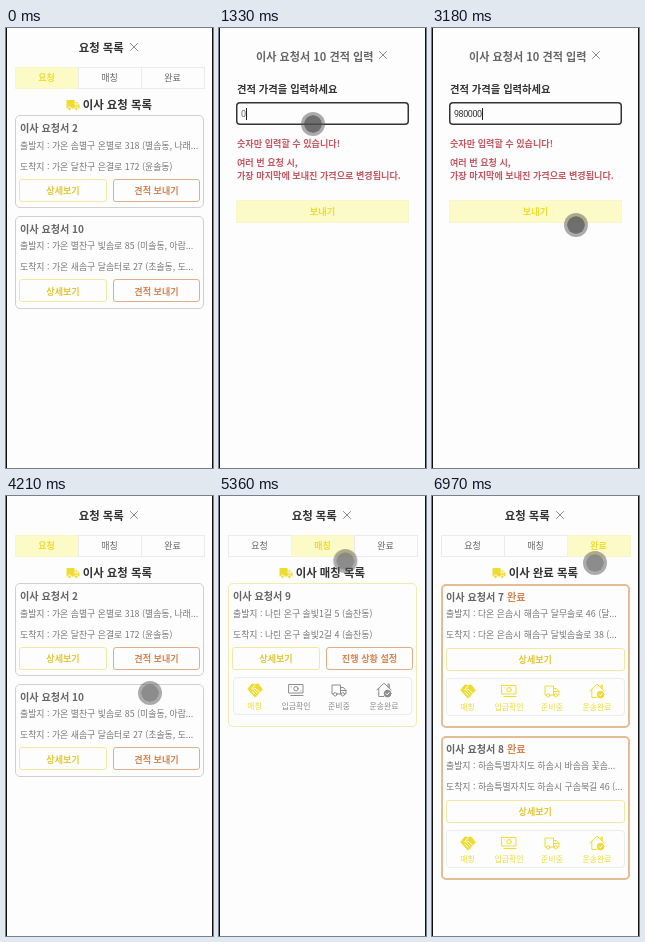
An HTML page for the animation above (7 s loop, 207 by 440 pixels).

```html
<!DOCTYPE html>
<html lang="ko">
<head>
<meta charset="utf-8">
<title>이사 요청 목록</title>
<style>
  html, body { margin: 0; width: 100%; height: 100%; overflow: hidden; background: #fefdfe; }
  body { font-family: "Noto Sans CJK KR", "Noto Sans CJK", "Noto Sans", sans-serif; color: #666; }
  #stage { position: absolute; left: 0; top: 0; width: 207px; height: 440px; overflow: hidden; }
  #stage::after { content: ""; position: absolute; inset: 0; border: solid #111; border-width: 0 1px; }
  .page, .box, .text, svg { position: absolute; box-sizing: border-box; }
  .page { inset: 0; animation: 7s step-end infinite; }
  .box { border: 1px solid #d0d0d0; }
  .text { line-height: 16px; white-space: nowrap; transform: translateY(-50%); }
  .mid { transform: translate(-50%, -50%); }
  .bold { font-weight: 700; }
  .black { color: #333; }
  .soft { color: #777; }
  .gray { color: #8c8c8c; }
  .yellow { color: #f0dc30; }
  .gold { color: #e2c836; }
  .orange { color: #d58550; }
  .red { color: #c5555f; }
  .fill { background: #fcfac6; border-color: #f7f5cc; }

  #requests { animation-name: requests; }
  #form { animation-name: form; }
  #match { animation-name: match; }
  #done { animation-name: done; }
  @keyframes requests {
    0%, 49.43% { visibility: visible; }
    11.71%, 64.57%, 100% { visibility: hidden; }
  }
  @keyframes form {
    0%, 49.43%, 100% { visibility: hidden; }
    11.71% { visibility: visible; }
  }
  @keyframes match {
    0%, 79.14%, 100% { visibility: hidden; }
    64.57% { visibility: visible; }
  }
  @keyframes done {
    0% { visibility: hidden; }
    79.14%, 100% { visibility: visible; }
  }

  .input { border: 0; border-radius: 4px; animation: focus 7s step-end infinite; }
  @keyframes focus {
    0% { box-shadow: inset 0 0 0 1px #bbb; }
    18.57%, 100% { box-shadow: inset 0 0 0 1.5px #333; }
  }
  .price { font: 9px/12px Roboto, sans-serif; letter-spacing: -.45px; position: absolute; left: 22px; top: 80px; }
  .zero { animation: zero 7s step-end infinite; }
  @keyframes zero {
    0% { opacity: 1; }
    23.43%, 100% { opacity: 0; }
  }
  .typed { overflow: hidden; border-right: 1px solid; animation: type 7s step-end infinite; }
  @keyframes type {
    0% { width: 4.6px; color: transparent; border-color: transparent; }
    18.57% { width: 4.6px; color: transparent; border-color: #222; }
    23.43% { width: 4.6px; color: #333; border-color: #222; }
    26% { width: 9.2px; color: #333; border-color: #222; }
    28.57% { width: 13.8px; color: #333; border-color: #222; }
    31.14% { width: 18.4px; color: #333; border-color: #222; }
    33.43% { width: 23px; color: #333; border-color: #222; }
    35.43%, 100% { width: 27.6px; color: #333; border-color: #222; }
  }

  #pointer {
    position: absolute; left: -12px; top: -12px; width: 24px; height: 24px;
    animation: move 7s linear infinite;
  }
  #pointer i {
    display: block; box-sizing: border-box; width: 24px; height: 24px; border-radius: 50%;
    border: 3px solid rgba(90, 90, 90, .5); background-clip: padding-box;
    animation: press 7s step-end infinite;
  }
  @keyframes move {
    0%, 8.28% { transform: translate(150px, 263px); opacity: 0; }
    8.29%, 12.29% { transform: translate(150px, 263px); opacity: 1; }
    17.71%, 38.57% { transform: translate(94px, 96px); }
    42%, 44.57% { transform: translate(148px, 139px); }
    45.29%, 60.29% { transform: translate(144px, 197px); }
    64%, 75.29% { transform: translate(104px, 64px); }
    79%, 90% { transform: translate(168px, 67px); }
    90.43%, 100% { transform: translate(163px, 67px); opacity: 1; }
  }
  @keyframes press {
    0%, 12%, 20.7%, 49.1%, 71.5%, 82.9%, 100% { background-color: rgba(80, 80, 80, .65); }
    9.71%, 18.43%, 45.2%, 64.3%, 79.14% { background-color: rgba(80, 80, 80, .82); }
  }
</style>
</head>
<body>
<svg width="0" height="0">
  <symbol id="close" viewBox="0 0 8 8"><path d="M.5 .5l7 7M7.5 .5l-7 7"/></symbol>
  <symbol id="van" viewBox="0 0 14 12">
    <path fill="currentColor" stroke="none" d="M1 1h7.5v2H11l2.5 3v3.5H.5V1.5z"/>
    <path stroke="#fefdfe" stroke-width=".8" d="M9.3 4h1.4l1.5 2H9.3z"/>
    <g fill="currentColor" stroke="#fefdfe" stroke-width=".8"><circle cx="3.6" cy="9.7" r="1.8"/><circle cx="10.4" cy="9.7" r="1.8"/></g>
  </symbol>
  <symbol id="deal" viewBox="0 0 16 16">
    <path fill="currentColor" d="M8 15L.8 7.2 5 1.8 8 2.8l3-1 4.2 5.4z"/>
    <path stroke="#fefdfe" d="M8 3.2L4.6 6.6q1.6 1.5 3.4-.5l4.6 4M5.2 9.4l2.8 2.8M7.2 8.2l2.8 2.8"/>
  </symbol>
  <symbol id="cash" viewBox="0 0 16 16">
    <path d="M1 2.5h14v8.5H1zM3 13.5h12"/><circle cx="8" cy="6.7" r="2.2"/><path d="M3.2 4.7v.2M12.8 8.7v.2"/>
  </symbol>
  <symbol id="truck" viewBox="0 0 16 16">
    <path d="M2.5 12H1V3h8.5v9H6M9.5 5.5h3L15 8.5V12h-1.5M9.5 12h.7M10 8.5h5"/>
    <circle cx="4.2" cy="12.3" r="1.7"/><circle cx="11.8" cy="12.3" r="1.7"/>
  </symbol>
  <symbol id="home" viewBox="0 0 16 16">
    <path d="M.8 8L8 1.2 15.2 8M2.8 6.5v8h5M12 4.8V2h1.3v4"/>
    <circle cx="11.6" cy="11.6" r="3.4" fill="currentColor"/><path stroke="#fefdfe" d="M10 11.7l1.2 1.2 2-2.3"/>
  </symbol>
</svg>
<div id="stage">
  <div class="page" id="requests"></div>
  <div class="page" id="form"></div>
  <div class="page" id="match"></div>
  <div class="page" id="done"></div>
  <div id="pointer"><i></i></div>
</div>
<script>
  const text = (x, y, size, str, cls = '') =>
    `<div class="text ${cls}" style="left:${x}px;top:${y}px;font-size:${size}px">${str}</div>`;
  const box = (x, y, w, h, style = '', cls = '') =>
    `<div class="box ${cls}" style="left:${x}px;top:${y}px;width:${w}px;height:${h}px;${style}"></div>`;
  const icon = (id, x, y, w, h, cls) =>
    `<svg class="${cls}" style="left:${x - w / 2}px;top:${y - h / 2}px" width="${w}" height="${h}"
      fill="none" stroke="currentColor" stroke-linejoin="round" stroke-linecap="round"><use href="#${id}"/></svg>`;
  const button = (x, y, w, str, color, border) =>
    box(x, y, w, 23, `border-color:${border};border-radius:3px`) +
    text(x + w / 2, y + 11.3, 9.1, str, `mid bold ${color}`);

  const YELLOW = '#f2e8a0', ORANGE = '#dfae8a';
  const tabs = ['요청', '매칭', '완료'];
  const steps = [['deal', '매칭', 35.5], ['cash', '입금확인', 77], ['truck', '준비중', 120], ['home', '운송완료', 165]];

  function header(active) {
    const cells = tabs.map((name, i) =>
      box(9 + 63 * i, 39, 63.5, 22, i === active ? '' : 'border-color:#ebebed', i === active ? 'fill' : '') +
      text(40.5 + 63 * i, 50, 9, name, `mid ${i === active ? 'bold yellow' : ''}`)).join('');
    return text(72.7, 18.5, 11.4, '요청 목록', 'bold black') + icon('close', 128, 18.5, 8, 8, 'gray') + cells +
      icon('van', 67, 76.5, 14, 12, 'yellow') + text(76.7, 76, 11.4, `이사 ${tabs[active]} 목록`, 'bold black');
  }

  const status = (y, reached) =>
    box(14, y, 179, 38, 'border-color:#ececec;border-radius:4px') +
    steps.map(([id, label, x], i) => {
      const color = i < reached ? 'yellow' : 'gray';
      return icon(id, x, y + 13, 16, 16, color) + text(x, y + 28.5, 7.9, label, `mid ${color}`);
    }).join('');

  const card = (y, h, border, title, from, to) =>
    box(9, y, 189, h, `border:${border};border-radius:5px`) +
    text(14, y + 13, 10.1, title, 'bold') +
    text(14, y + 30.5, 8.9, `출발지 : ${from}`, 'soft') +
    text(14, y + 51.5, 8.9, `도착지 : ${to}`, 'soft');

  const pair = (y, action) =>
    button(13, y, 88, '상세보기', 'gold', YELLOW) + button(107, y, 87, action, 'orange', ORANGE);

  const request = (y, n, from, to) =>
    card(y, 93, '1px solid #d0d0d0', `이사 요청서 ${n}`, from, to) + pair(y + 63.7, '견적 보내기');

  const finished = (y, n, from, to) =>
    card(y, 144.5, '2px solid #e6bd92', `이사 요청서 ${n} <span class="orange">완료</span>`, from, to) +
    button(14, y + 64.5, 178.5, '상세보기', 'gold', YELLOW) + status(y + 94.5, 4);

  const fill = (id, html) => document.getElementById(id).innerHTML = html;

  fill('requests', header(0) +
    request(87, 2, '가온 솜별구 온별로 318 (별솜동, 나래...', '가온 달찬구 은결로 172 (윤솔동)') +
    request(187.6, 10, '가온 별찬구 빛솜로 85 (미솔동, 아람...', '가온 새솜구 달솜터로 27 (초솔동, 도...'));

  fill('form',
    text(37, 27.5, 11.1, '이사 요청서 10 견적 입력', 'bold') + icon('close', 163.5, 27, 8, 8, 'gray') +
    text(18, 61, 10.3, '견적 가격을 입력하세요', 'bold black') +
    box(17, 74, 172.5, 23, '', 'input') +
    '<div class="price zero">0</div><div class="price typed">980000</div>' +
    text(18, 115, 9.1, '숫자만 입력할 수 있습니다!', 'bold red') +
    text(18, 134, 9.1, '여러 번 요청 시,', 'bold red') +
    text(18, 146.5, 9.1, '가장 마지막에 보내진 가격으로 변경됩니다.', 'bold red') +
    box(17, 171.5, 172.5, 23, '', 'fill') + text(103.5, 183, 9.2, '보내기', 'mid bold yellow'));

  fill('match', header(1) +
    card(87, 143.5, '1px solid #f0ebae', '이사 요청서 9', '나린 온구 솔빛1길 5 (솔찬동)', '나린 온구 솔빛2길 4 (솔찬동)') +
    pair(151, '진행 상황 설정') + status(181, 1));

  fill('done', header(2) +
    finished(87.5, 7, '다온 은솜시 해솜구 달무솔로 46 (달...', '다온 은솜시 해솜구 달빛솜솔로 38 (...') +
    finished(239.5, 8, '하솜특별자치도 하솜시 바솜읍 꽃솜...', '하솜특별자치도 하솜시 구솜북길 46 (...'));
</script>
</body>
</html>
```
